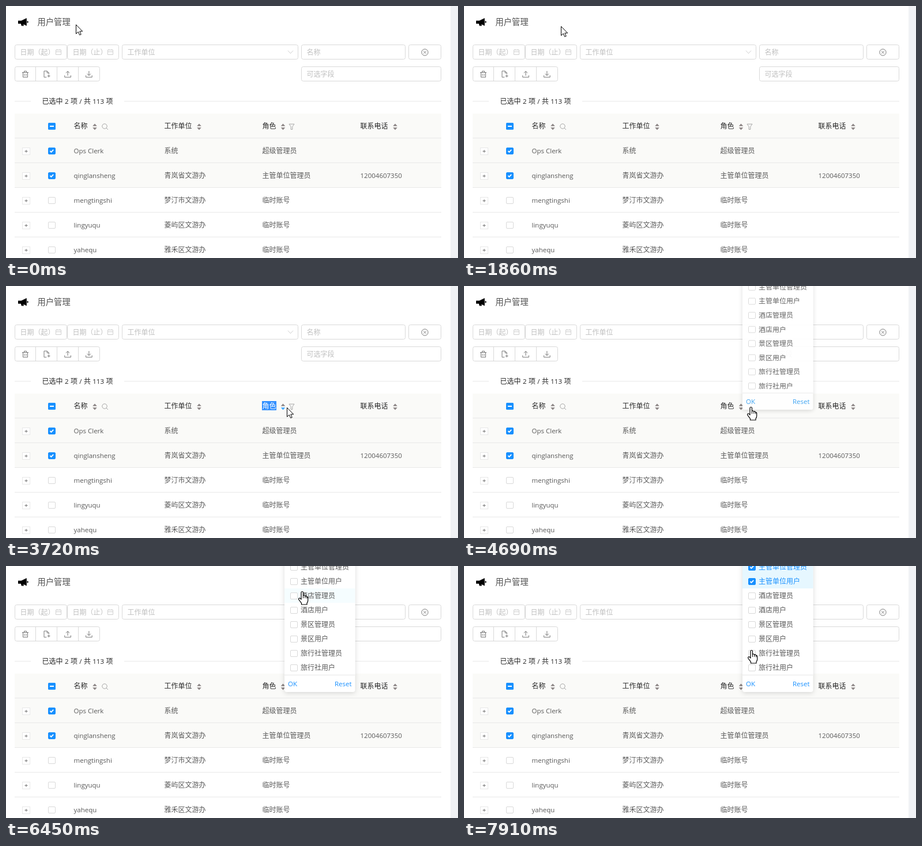
An HTML page for the animation above (8000 ms loop, 784x438 px).

```html
<!DOCTYPE html>
<html lang="zh-CN">
<head>
<meta charset="utf-8">
<title>用户管理</title>
<style>
  html, body { margin: 0; width: 100%; height: 100%; overflow: hidden; background: #fff; }
  svg { display: block; width: 784px; height: 438px; }
  text { font: 12px "Noto Sans CJK SC", "Noto Sans CJK", sans-serif; fill: #595959; white-space: pre; }
  .latin { font: 11.5px "Open Sans", "Noto Sans", sans-serif; }
  .title { font-size: 14.3px; fill: #505050; }
  .head { fill: #262626; }
  .hint { fill: #bfbfbf; }
  .inv { fill: #fff; }
  .link { fill: #1890ff; }
  .box { fill: #fff; stroke: #d9d9d9; }
  .rule { stroke: #e8e8e8; }
  .icon { fill: none; stroke: #777; }
  .soft { fill: none; stroke: #a6a6a6; }
  .pale { fill: none; stroke: #d0d0d0; }
  .sort { fill: #8c8585; }
  .sort.hot { fill: #40a9ff; }
  .tick { fill: none; stroke: #fff; stroke-width: 1.8; }
  .check .mark { visibility: hidden; }
  .on .mark { visibility: visible; }
  .on .box { fill: #1890ff; stroke: #1890ff; }
  .bg { fill: #fff; }
  .hover .bg { fill: #f5fdff; }
  .option.on .bg { fill: #e6f7ff; }
  .option.on text { fill: #1890ff; }
  #panel { filter: drop-shadow(0 2px 4px rgba(0, 0, 0, .14)); }
  #panel.opening { transform: scaleY(.982); opacity: .92; }
  #panel.opening .link { fill: #2f9df2; }
  .cursor { fill: #fff; stroke: #000; stroke-linejoin: round; }
</style>
</head>
<body>
<svg viewBox="0 0 784 438">
  <defs><clipPath id="clip"><rect id="selected" x="444" y="200" width="0" height="16"/></clipPath></defs>
  <g id="page"></g>
  <g clip-path="url(#clip)" id="selection"></g>
  <g id="panel"></g>
  <g id="pointer">
    <path id="arrow" class="cursor" d="M.5.5V16.3L4.2 12.9 6.7 18.4 9.2 17.4 6.8 12H11.7Z"/>
    <path id="beam" fill="none" stroke="#222" d="M-3-7.5H-1L0-6.5 1-7.5H3M0-6.5V6.5M-3 7.5H-1L0 6.5 1 7.5H3"/>
    <g id="hand">
      <path class="cursor" stroke-width="1.2" d="M-2 14V2Q-2 .5-.2.5 1.5.5 1.5 2V8Q1.7 6.8 3.2 7 4.8 7.2 4.8 8.8 5.2 7.7 6.5 8 7.8 8.3 7.8 9.9 9.5 9 9.7 11V16Q9.7 18.5 8 20.3V23H-1.5V20.7L-6 14.6Q-7 12.8-5.6 11.9-4.5 11.4-3.2 12.6Z"/>
      <path fill="none" stroke="#000" d="M1.5 8V12M4.8 8.8V12M7.8 10V12.5"/>
    </g>
  </g>
</svg>
<script>
const LOOP = 8000;
const $ = id => document.getElementById(id);

// Latin runs get their own face and size
const text = (x, y, str, cls = '', extra = '') =>
  `<text x="${x}" y="${y}" class="${cls}" ${extra}>` +
  str.replace(/[\x20-\x7e]+/g, run => `<tspan class="latin">${run}</tspan>`) + '</text>';
const rect = (x, y, w, h, cls, r = 0) =>
  `<rect x="${x}" y="${y}" width="${w}" height="${h}" rx="${r}" class="${cls}"/>`;
const path = (d, cls, x = 0, y = 0) =>
  `<path class="${cls}" transform="translate(${x} ${y})" d="${d}"/>`;
const line = (y, x1 = 15, x2 = 755) => path(`M${x1} ${y}H${x2}`, 'rule');
const field = (x, y, w, hint) =>
  rect(x + .5, y + .5, w - 1, 25, 'box', 3) + (hint ? text(x + 9.5, y + 18, hint, 'hint') : '');
const check = (x, y, on) =>
  `<g class="check ${on ? 'on' : ''}">` + rect(x - 5.5, y - 5.5, 12, 11, 'box', 1.5) +
  path('M-2.6-.1L-.6 2 3.2-2.2', 'tick mark', x, y) + '</g>';
const sorter = (x, id) =>
  path('M-3.8-1.3L0-5.6 3.8-1.3Z', 'sort', x, 210) +
  `<path ${id ? `id="${id}"` : ''} class="sort" transform="translate(${x} 210)" d="M-3.8 1.3L0 5.6 3.8 1.3Z"/>`;

function drawPage() {
  const calendar = 'M-4.5-3.5H4.5V4.5H-4.5ZM-4.5-.5H4.5M-2.5-5V-3M2.5-5V-3';
  const horn = 'M21 25.5H26.5L35.8 21V34.5L30.3 31.7 31 34.6H26.8L25.8 30.8H21ZM36.6 25.7Q38.8 26 38.8 27.7 38.8 29.4 36.6 29.7Z';
  const tools = [
    'M-5.5-3H5.5M-2-3V-5.3H2V-3M-4-3V5.3H4V-3M-1.5-.5V3M1.5-.5V3',
    'M0 5.3H-4.3V-5.5H1L4-2.5V0M.8-5.5V-2.3H4M1.5 3.2H6.3M3.9.8V5.6',
    'M-5.3 2V5.3H5.3V2M0 2.5V-5M-3-2L0-5.2 3-2',
    'M-5.3 2V5.3H5.3V2M0 2.3V-5.5M-3-.8L0 2.4 3-.8'
  ];
  const users = [
    ['Ops Clerk', '系统', '超级管理员', ''],
    ['qinglansheng', '青岚省文游办', '主管单位管理员', '12004607350'],
    ['mengtingshi', '梦汀市文游办', '临时账号', ''],
    ['lingyuqu', '菱屿区文游办', '临时账号', ''],
    ['yahequ', '雅禾区文游办', '临时账号', '']
  ];
  const cols = [117.5, 274.5, 444.5, 614.5];

  let out = '<rect x="771" width="13" height="438" fill="#f0f2f5"/>';
  out += path(horn, '') + text(54.5, 33.3, '用户管理', 'title');

  out += field(15, 67, 91, '日期（起）') + field(106, 67, 90, '日期（止）');
  out += path(calendar, 'pale', 91, 80) + path(calendar, 'pale', 181, 80);
  out += field(201, 67, 306, '工作单位') + path('M-4.5-2.5L0 2.5 4.5-2.5', 'pale', 493.5, 80);
  out += field(512, 67, 181, '名称') + field(698, 67, 57) + field(512, 105, 243, '可选字段');
  out += '<circle class="icon" cx="726.5" cy="80.5" r="5.6"/>' +
    path('M-2.2-2.2L2.2 2.2M2.2-2.2L-2.2 2.2', 'icon', 726.5, 80.5);

  out += rect(15.5, 105.5, 147, 25, 'box', 3);
  tools.forEach((d, i) => {
    if (i) out += path('M0 105V131', 'box', 14.5 + 37 * i, 0);
    out += path(d, 'icon', 33.5 + 36.8 * i, 118.5);
  });

  out += line(165.5, 15, 43) + line(165.5, 205) +
    text(62.5, 170, '已选中 2 项 / 共 113 项', 'head', 'word-spacing=".4"');

  out += '<rect x="15" y="187" width="740" height="128" fill="#fafaf8"/>' + line(229.5);
  out += rect(73, 203, 13, 12, 'link', 1.5) + rect(76, 208, 7, 2, 'inv');
  ['名称', '工作单位', '角色', '联系电话'].forEach((name, i) => out += text(cols[i], 213, name, 'head'));
  out += sorter(154) + sorter(335) + sorter(480.5, 'roleSort') + sorter(675);
  out += '<circle class="soft" cx="171" cy="209" r="4.2"/>' + path('M174 212L177 215', 'soft');
  out += path('M-4.5-4.5H4.5L1.3 0V4.8H-1.3V0Z', 'soft', 495.5, 209.7);

  users.forEach((user, i) => {
    const y = 252 + 43 * i;
    out += rect(28.5, y - 5.5, 13, 12, 'box rule') + path('M-2.5 0H2.5M0-2.5V2.5', 'icon', 35, y + .5);
    out += check(79, y, i < 2);
    user.forEach((cell, c) => out += text(cols[c], y + 4.2, cell));
    out += line(y + 20.5);
  });
  $('page').innerHTML = out;
  $('selection').innerHTML = '<rect x="444" y="200" width="25" height="16" fill="#3390ff"/>' +
    text(cols[2], 213, '角色', 'inv');
}

function drawPanel() {
  const roles = ['主管单位管理员', '主管单位用户', '酒店管理员', '酒店用户',
    '景区管理员', '景区用户', '旅行社管理员', '旅行社用户'];
  $('panel').innerHTML = rect(483, -20, 122.5, 239, 'bg', 4) +
    roles.map((role, i) => {
      const y = 1.5 + 25 * i;
      return '<g class="option">' + rect(483, y - 12.5, 122.5, 25, 'bg') +
        check(499, y + .5) + text(511, y + 4.5, role) + '</g>';
    }).join('') +
    line(189.5, 483, 605.5) + text(489, 209, 'OK', 'link') +
    text(599.5, 209, 'Reset', 'link', 'text-anchor="end"');
}

// Each move: first step, last step, step count, knots of [step, x, y]
const moves = [
  [450, 1000, 6, [[6, 53, 18]]],
  [1330, 1650, 4, [[4, 165, 31]]],
  [1860, 2630, 8, [[1, 168, 35], [8, 461, 218]]],
  [2750, 2960, 3, [[2, 443, 208], [3, 442, 212]]],
  [3180, 3390, 3, [[3, 470, 212]]],
  [3600, 4140, 6, [[2, 487, 211], [6, 498, 210]]],
  [5130, 5890, 8, [[2, 533, 105], [3, 541, 82], [5, 548, 36], [8, 535, 124]]],
  [6130, 6890, 8, [[3, 519, 58], [4, 514, 44], [8, 502, 4]]],
  [7010, 7450, 5, [[2, 501, 4], [5, 500, 28]]],
  [7670, 7910, 3, [[3, 499, 146]]]
];

function buildTrack() {
  const track = [{ at: 0, x: 121, y: 32 }];
  for (const [from, to, count, knots] of moves) {
    let { x, y } = track[track.length - 1];
    let step = 0;
    for (const [end, kx, ky] of knots) {
      const start = step;
      while (step < end) {
        step++;
        const p = (step - start) / (end - start);
        const e = p * p * (3 - 2 * p);
        const delay = Math.floor((to - from) * (step - 1) / (count - 1) / 10) * 10;
        track.push({ at: from + delay, x: Math.round(x + (kx - x) * e), y: Math.round(y + (ky - y) * e) });
      }
      [x, y] = [kx, ky];
    }
  }
  return track;
}

const within = (p, x1, y1, x2, y2) => p.x >= x1 && p.x < x2 && p.y >= y1 && p.y < y2;

function cursorKind(p, open) {
  if (open || within(p, 490, 200, 505, 218)) return 'hand';
  return within(p, 55, 20, 113, 37) || within(p, 444, 200, 472, 217) ? 'beam' : 'arrow';
}

drawPage();
drawPanel();
const track = buildTrack();
const options = [...document.querySelectorAll('.option')];

function render(t) {
  let i = track.length - 1;
  while (track[i].at > t) i--;
  const now = track[i], prev = track[Math.max(0, i - 1)];
  const open = t >= 4690;

  $('pointer').setAttribute('transform', `translate(${now.x} ${now.y})`);
  const kind = cursorKind(now, open);
  for (const id of ['arrow', 'beam', 'hand']) $(id).style.display = id === kind ? '' : 'none';

  $('roleSort').classList.toggle('hot', within(now, 474, 204, 490, 216));
  $('selected').setAttribute('width', t < 3280 || t >= 4480 ? 0 : t < 3390 ? 12.5 : 25);

  $('panel').style.display = open ? '' : 'none';
  $('panel').classList.toggle('opening', t < 4790);
  // The hover tint trails the pointer by one step; quick passes leave none
  const slow = Math.hypot(now.x - prev.x, now.y - prev.y) < 30;
  const row = slow && prev.y < 189 ? Math.floor((prev.y + 11) / 25) : -1;
  options.forEach((option, n) => {
    const on = n === 0 ? t >= 7010 : n === 1 && t >= 7670;
    option.classList.toggle('hover', n === row);
    option.classList.toggle('on', on);
    option.querySelector('.check').classList.toggle('on', on);
  });
}

const origin = performance.now();
function tick() {
  render((performance.now() - origin) % LOOP);
  requestAnimationFrame(tick);
}
tick();
</script>
</body>
</html>
```
